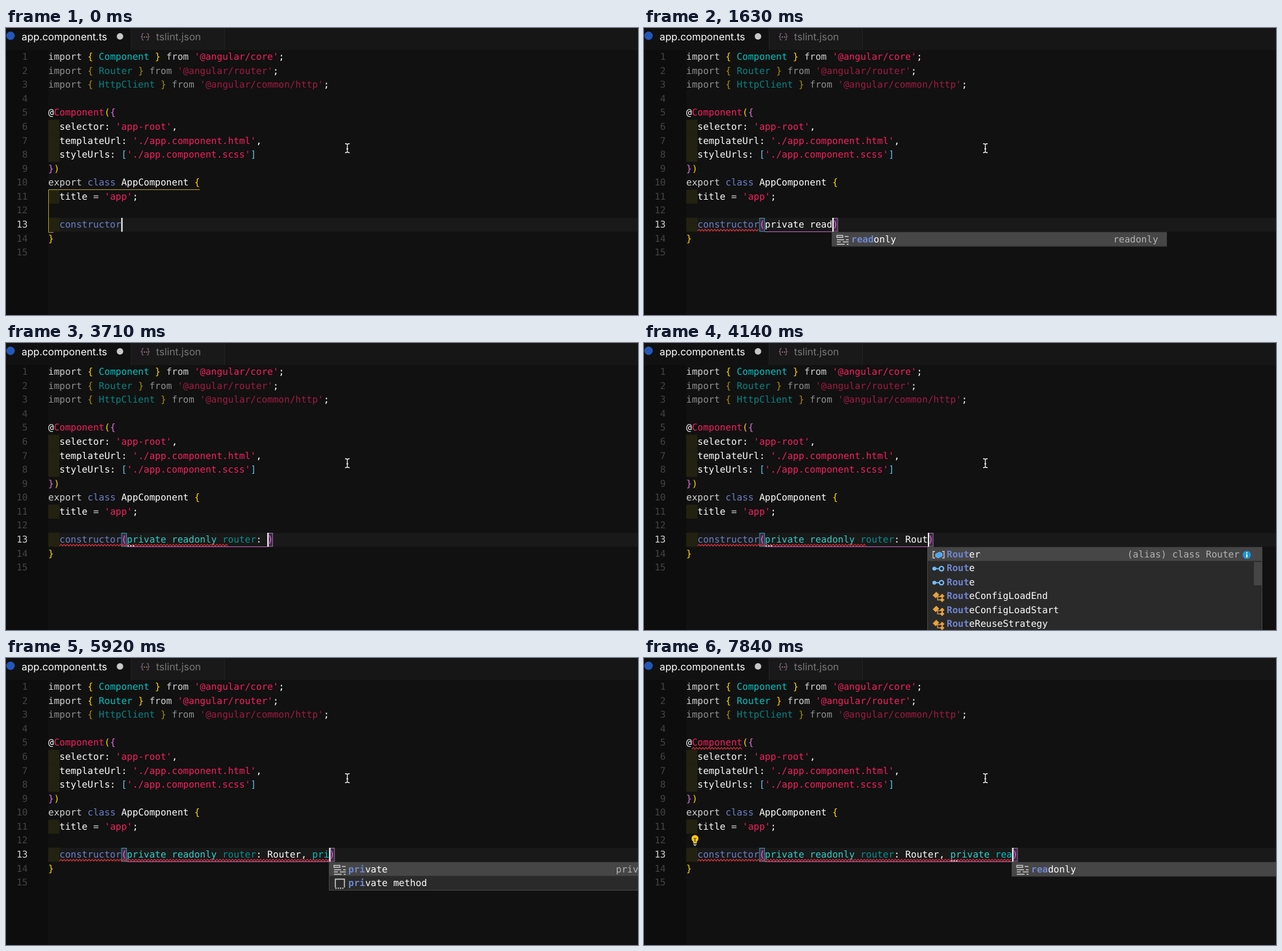
These frames come from a looping animation (973x443 px, 7990 ms). An HTML page:

```html
<!DOCTYPE html>
<html lang="en">
<head>
<meta charset="utf-8">
<title>Typing a constructor</title>
<style>
html, body { margin: 0; width: 100%; height: 100%; overflow: hidden; background: #111; }
svg { display: block; }
text { white-space: pre; text-rendering: geometricPrecision; font: 14.37px "DejaVu Sans Mono", monospace; }
.tab { font: 15.4px Inter, sans-serif; }
.w { fill: #fff; } .g { fill: #d4d4d4; } .y { fill: #ffd700; } .o { fill: #da70d6; }
.s { fill: #5fc3e8; } .r { fill: #f4205f; } .b { fill: #6c80c8; } .c { fill: #00c5c5; }
.k { fill: #35cfc9; } .d { fill: #078f8f; } .n { fill: #444; } .i { fill: #b4b4b4; }
.dim { fill-opacity: .64; }
.hit { font-weight: bold; fill: #6f86d0; }
.wave { fill: none; stroke: #f0303c; stroke-width: 1.1; }
</style>
</head>
<body>
<svg id="stage" width="973" height="443" viewBox="0 0 973 443"></svg>
<script>
const CH = 8.651, ROW = 21.57, LOOP = 7990;
const colX = c => 65 + c * CH;
const rowY = n => 33.9 + (n - 1) * ROW;

// Each token starts with its colour class.
const code = [
  "gimport |y{ |cComponent|y } |gfrom |r'@angular/core'|w;",
  "gimport |y{ |cRouter|y } |gfrom |r'@angular/router'|w;",
  "gimport |y{ |cHttpClient|y } |gfrom |r'@angular/common/http'|w;",
  "", "w@|rComponent|y(|o{",
  "w  selector: |r'app-root'|w,",
  "w  templateUrl: |r'./app.component.html'|w,",
  "w  styleUrls: |s[|r'./app.component.scss'|s]",
  "o}|y)", "gexport |bclass|w AppComponent |y{",
  "w  title |g= |r'app'|w;", "", "", "y}", ""
];

// Popups: typed letters, detail text, items with an icon letter.
const priv = n => ({ n, detail: "private", items: ["kprivate", "sprivate method"] });
const read = n => ({ n, detail: "readonly", items: ["kreadonly"] });
const pr = extra => ({ n: 2, detail: "private", items: ["kprivate", "kprotected", "sprivate method", "sprotected method", ...extra] });
const rout = n => ({ n, detail: "(alias) class Router", info: true, items: ["vRouter", "iRoute", "iRoute",
  "cRouteConfigLoadEnd", "cRouteConfigLoadStart", "cRouteReuseStrategy"] });

const PR = "kprivate|k readonly";
const ALL = PR + "|d router|w: Router";
// time, typed tokens, squiggle end column, flags, popup
// flags: e brace error, b bulb, h/H hint dots, u router used, x decorator error
const steps = [
  [0],
  [150, ""],
  [300, "wp"],
  [440, "wpr", 0, "", pr(["vprocess", "vprompt"])],
  [590, "wpriv", 0, "", priv(4)],
  [740, "wprivate", 13, "e"],
  [890, "wprivate ", 13, "e"],
  [1190, "wprivate r", 13],
  [1340, "wprivate re", 13, "", read(2)],
  [1490, "wprivate rea", 13, "", read(3)],
  [1630, "wprivate read", 13, "", read(4)],
  [1930, "kprivate|c readonly", 13],
  [2380, "kprivate|d readonly ", 13],
  [2530, "kprivate|d readonly ", 32, "h"],
  [2670, "kprivate|d readonly ", 32, "hb"],
  [2970, PR + "|c r", 32, "h"],
  [3120, PR + "|c rou", 32, "h"],
  [3270, PR + "|c rout", 32, "h"],
  [3410, PR + "|d router", 32, "h"],
  [3560, PR + "|d router|w:", 32, "h"],
  [3710, PR + "|d router|w: ", 32, "h"],
  [3860, PR + "|d router|w: Ro", 32, "h", rout(2)],
  [4000, PR + "|d router|w: Rou", 32, "h", rout(3)],
  [4140, PR + "|d router|w: Rout", 32, "h", rout(4)],
  [4440, ALL, 32, "h"],
  [4590, ALL, 45, "h"],
  [4880, ALL, 45, "u"],
  [5180, ALL + ",", 46, "u"],
  [5480, ALL + ", ", 47, "u"],
  [5620, ALL + ", |cp", 48, "u"],
  [5770, ALL + ", |cpr", 49, "u", pr([])],
  [5920, ALL + ", |cpri", 50, "u", priv(3)],
  [6060, ALL + ", |cpriv", 51, "u", priv(4)],
  [6360, ALL + ", |cprivate", 54, "u"],
  [6500, ALL + ", |kprivate", 54, "u"],
  [7100, ALL + ", |kprivate ", 55, "u"],
  [7250, ALL + ", |kprivate ", 55, "uH"],
  [7400, ALL + ", |kprivate ", 55, "uHbx"],
  [7540, ALL + ", |kprivate|c r", 56, "uHbx"],
  [7690, ALL + ", |kprivate|c re", 57, "uHbx", read(2)],
  [7840, ALL + ", |kprivate|c rea", 58, "uHbx", read(3)]
];

const rect = (x, y, w, h, fill, more = "") => `<rect x="${x}" y="${y}" width="${w}" height="${h}" fill="${fill}" ${more}/>`;
const path = (d, stroke, w = 1, fill = "none") => `<path d="${d}" stroke="${stroke}" stroke-width="${w}" fill="${fill}"/>`;
const disc = (x, y, r, fill) => `<circle cx="${x}" cy="${y}" r="${r}" fill="${fill}"/>`;
const label = (x, y, cls, s) => `<text x="${x}" y="${y}" class="${cls}">${s}</text>`;

function line(n, src, dim) {
  let col = 0;
  const spans = src.split("|").filter(Boolean).map(tok => {
    const cls = tok[0], s = tok.slice(1), x = colX(col);
    col += s.length;
    return `<tspan x="${x}" class="${cls}${dim && cls != "w" ? " dim" : ""}">${s}</tspan>`;
  });
  return `<text y="${rowY(n) + 15.2}">${spans.join("")}</text>`;
}

function wave(n, from, to) {
  const y = rowY(n) + 20.6, end = colX(to);
  let x = colX(from), d = `M${x} ${y}`;
  for (let up = true; x + 2.4 <= end; up = !up) d += `L${x += 2.4} ${up ? y - 2.6 : y}`;
  return `<path class="wave" d="${d}"/>`;
}

function dots(col) {
  return [0, 4, 8].map(dx => rect(colX(col) + 1 + dx, 312, 2, 2, "#c8c8c8")).join("");
}

function bracket(col, edge) {
  return rect(colX(col) + .5, 293.5, CH - 1, 20.5, "#45264a", `stroke="${edge}"`);
}

const icons = {
  k: (x, y) => path(`M${x} ${y - 6.5}h9v3h-9zM${x + 12} ${y - 5}h6M${x} ${y}h11M${x + 14} ${y}h4M${x} ${y + 3.5}h6M${x + 9} ${y + 3.5}h9M${x} ${y + 7}h12M${x + 15} ${y + 7}h3`, "#c5c5c5", 1.4),
  s: (x, y) => path(`M${x + 2} ${y + 6}v-13h14v13`, "#c5c5c5", 1.6) +
    [2, 5.5, 9, 12.5].map(dx => rect(x + dx, y + 6, 2, 2, "#c5c5c5")).join(""),
  v: (x, y) => path(`M${x + 4} ${y - 5}h-3v10h3M${x + 15} ${y - 5}h3v10h-3`, "#c5c5c5", 1.4) +
    path(`M${x + 5} ${y - 1}l6 -3l4 2v4l-6 3l-4 -2z`, "#75beff", 1, "#4ea5ee"),
  i: (x, y) => disc(x + 3, y, 3, "#75beff") + path(`M${x + 5} ${y}h5`, "#75beff", 1.8) +
    `<circle cx="${x + 14}" cy="${y}" r="3.3" fill="none" stroke="#75beff" stroke-width="2"/>`,
  c: (x, y) => path(`M${x + 1} ${y - 2}l5 -5l4 4l-5 5zM${x + 12} ${y - 1}l3 -3l3 3l-3 3zM${x + 12} ${y + 5}l3 -3l3 3l-3 3z`, "#e8a33d", 1, "#e8a33d") +
    path(`M${x + 7} ${y}h6M${x + 8} ${y}v5h5`, "#e8a33d", 1.3)
};

function popup(x, { n, detail, info, items }) {
  const top = 315.3, w = 516;
  let out = rect(x + .5, top, w - 1, items.length * ROW, "#2a2a2a", 'stroke="#454545"');
  out += rect(x + 1, top + .5, w - 2, ROW - 1, "#464646");
  items.forEach((item, i) => {
    const y = top + i * ROW, s = item.slice(1);
    out += icons[item[0]](x + 8, y + 11.5) +
      `<text x="${x + 30}" y="${y + 15.2}" class="w"><tspan class="hit">${s.slice(0, n)}</tspan>${s.slice(n)}</text>`;
  });
  const end = x + w - (info ? 35 : 13.4);
  out += label(end - detail.length * CH, top + 15.2, "i", detail);
  if (info) {
    out += disc(end + 11, 327, 6.3, "#1b94d8") + rect(end + 10.2, 326, 1.8, 5, "#fff") + rect(end + 10.2, 323, 1.8, 1.8, "#fff");
    out += rect(x + w - 13, 338, 12, 36, "#454545");
  }
  return out;
}

function tabs() {
  return rect(0, 0, 973, 34, "#161616") + rect(0, 0, 192, 34, "#111") + rect(193, 0, 143, 34, "#191919") +
    rect(192, 0, 1, 34, "#202020") + rect(336, 0, 1, 34, "#222") +
    disc(7, 12, 6.5, "#2458b8") + label(24, 19, "tab w", "app.component.ts") + disc(175.5, 13, 5, "#c8c8c8") +
    `<text x="206" y="17" style="font-size:12px;fill:#8c6a90">{</text><text x="215.500" y="17" style="font-size:12px;fill:#8c6a90">}</text>` +
    disc(213, 14, 1, "#a09050") + disc(216.500, 14, 1, "#a09050") +
    `<text x="231" y="19" class="tab" fill="#777">tslint.json</text>`;
}

function bulb() {
  return disc(78.5, 278.5, 5.3, "#ffc814") + rect(75.7, 282, 5.6, 4, "#ffc814") +
    path("M76.500 278.500h4M78.500 279v5", "#4a3a08", 1.2) + rect(76, 287, 5, 1.2, "#d8d8d8") + rect(77, 289, 3, 1, "#d8d8d8");
}

function scope() {
  return path("M298.500 249.500H65.500V315.500H73", "#b09a18");
}

function scene([, typed, squiggle, flags = "", list]) {
  const open = typed !== undefined, has = f => flags.includes(f);
  const args = open ? typed.split("|").map(t => t.slice(1)).join("") : "";
  const caret = (open ? 14 : 13) + args.length;
  let out = rect(0, 34, 65, 409, "#0d0d0d") + tabs() + rect(65, 293, 908, 21.5, "#191919");
  for (const n of [6, 7, 8, 11, 13]) out += rect(65, rowY(n), 17.3, ROW, "#232211");
  if (open) out += bracket(13, "#2c9c9c") + bracket(caret, "#87708c");
  code.forEach((src, i) => {
    const n = i + 1, num = String(n);
    out += label(33.5 - num.length * CH, rowY(n) + 15.2, n == 13 ? "g" : "n", num);
    if (n == 13) src = "b  constructor" + (open ? `|o(|${typed}|o)` : "");
    out += line(n, src, n == 3 || n == 2 && !has("u"));
  });
  if (open) out += rect(colX(14), 314, (caret - 14) * CH, 1, "#b864b4");
  else out += scope();
  if (squiggle) out += wave(13, 2, squiggle);
  if (has("e")) out += wave(14, 0, 1);
  if (has("x")) out += wave(5, 1, 10);
  if (has("h")) out += dots(14);
  if (has("H")) out += dots(47);
  if (has("b")) out += bulb();
  out += rect(colX(caret), 293, 2, 21.5, "#fff");
  if (list) out += popup(Math.floor(colX(caret)), list);
  return out + path("M522 178.500q3 0 3.500 1.500q.5 -1.500 3.500 -1.500M525.500 179.500v12M522 192.500q3 0 3.500 -1.500q.5 1.500 3.500 1.500M524 186.500h3", "#eee", 1.3);
}

const stage = document.getElementById("stage");
const start = performance.now();
let shown;
function tick() {
  const t = (performance.now() - start) % LOOP;
  const step = steps.findLast(s => s[0] <= t) || steps[0];
  if (step !== shown) stage.innerHTML = scene(shown = step);
  requestAnimationFrame(tick);
}
tick();
</script>
</body>
</html>
```
